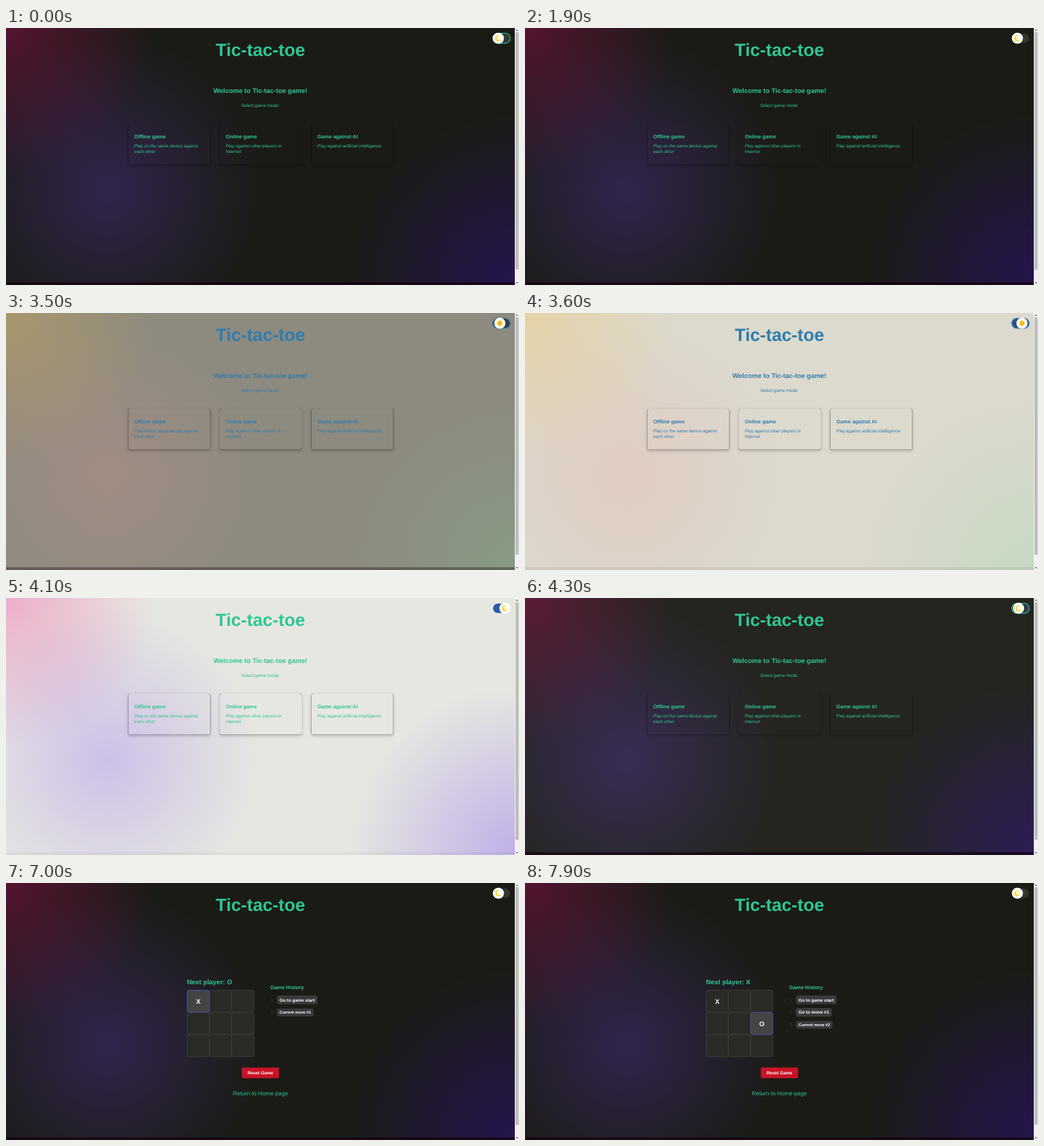
An HTML page with a canvas that plays this animation: 732 px wide and 368 px high, repeating every 8 s.

```html
<!DOCTYPE html>
<html lang="en">
<head>
<meta charset="utf-8">
<title>Tic-tac-toe</title>
<style>
html, body { margin: 0; width: 100%; height: 100%; overflow: hidden; background: #1b1b16; }
canvas { display: block; width: 732px; height: 368px; }
</style>
</head>
<body>
<canvas id="stage" width="732" height="368"></canvas>
<script>
const ctx = document.getElementById('stage').getContext('2d');
const LOOP = 8000, STEP = 100;
const PAGE_W = 726, PAGE_H = 364, MID = 363;
const ZOOM = 0.3957; // page pixels to stage pixels
const SANS = '"Liberation Sans", Arial, sans-serif';
const TO_LIGHT = 3410, TO_DARK = 4080, FADE = 300;
const OPEN_GAME = 5600, MOVE_X = 7000, MOVE_O = 7800;

const THEMES = {
  dark: { text: '#2ec794', glows: ['255,0,128,.25', '120,69,252,.24', '68,0,255,.24'] },
  light: { text: '#2e7daf', glows: ['255,190,50,.25', '240,150,150,.2', '110,220,150,.2'] }
};
const GLOW_SPOTS = [[0, 0, 215], [145, 232, 220], [PAGE_W, PAGE_H, 240]];
const CARDS = [
  [174.3, 'Offline game', 'Play on the same device against', 'each other'],
  [305, 'Online game', 'Play against other players in', 'Internet'],
  [435.6, 'Game against AI', 'Play against artificial intelligence']
];

const clamp = v => Math.min(1, Math.max(0, v));
const smooth = p => p * p * (3 - 2 * p);
const mix = (a, b, k) => `rgb(${a.map((v, i) => Math.round(v + (b[i] - v) * k))})`;

// The CSS "ease" curve, solved by bisection.
function ease(p) {
  const bez = (u, a, b) => 3 * (1 - u) ** 2 * u * a + 3 * (1 - u) * u * u * b + u ** 3;
  let lo = 0, hi = 1;
  for (let i = 0; i < 20; i++) {
    const u = (lo + hi) / 2;
    if (bez(u, .25, .25) < p) lo = u; else hi = u;
  }
  return bez(lo, .1, 1);
}

function rounded(x, y, w, h, r, fill, stroke, line = 0.6) {
  ctx.beginPath();
  ctx.roundRect(x, y, w, h, r);
  if (fill) { ctx.fillStyle = fill; ctx.fill(); }
  if (stroke) { ctx.strokeStyle = stroke; ctx.lineWidth = line; ctx.stroke(); }
}

function disc(x, y, r, fill) {
  ctx.beginPath();
  ctx.arc(x, y, r, 0, 7);
  ctx.fillStyle = fill;
  ctx.fill();
}

function text(str, x, y, size, color, { bold = false, align = 'left', family = SANS } = {}) {
  ctx.font = `${bold ? 'bold ' : ''}${size}px ${family}`;
  ctx.textAlign = align;
  ctx.fillStyle = color;
  ctx.fillText(str, x, y);
  return ctx.measureText(str).width;
}

function background(theme, lightness) {
  ctx.fillStyle = mix([27, 27, 22], [242, 242, 236], lightness);
  ctx.fillRect(0, 0, 732, 368);
  if (theme === THEMES.light) {
    ctx.fillStyle = 'rgba(200,160,60,.07)';
    ctx.fillRect(0, 0, 732, 368);
  }
  GLOW_SPOTS.forEach(([x, y, r], i) => {
    const glow = ctx.createRadialGradient(x, y, 0, x, y, r);
    const color = theme.glows[i];
    glow.addColorStop(0, `rgba(${color})`);
    glow.addColorStop(1, `rgba(${color.replace(/[^,]+$/, '0')})`);
    ctx.fillStyle = glow;
    ctx.fillRect(0, 0, PAGE_W, 368);
  });
  ctx.fillStyle = `rgba(18,3,12,${0.7 * (1 - lightness)})`;
  ctx.fillRect(0, PAGE_H, PAGE_W, 4);
}

function scrollbar() {
  ctx.fillStyle = '#f1f1f1';
  ctx.fillRect(PAGE_W, 0, 6, 368);
  ctx.fillStyle = '#bdbdbd';
  ctx.fillRect(727, 6, 4.5, 340);
  ctx.fillStyle = '#555';
  for (const [y, d] of [[3, -1], [365, 1]]) {
    ctx.beginPath();
    ctx.moveTo(727.6, y - d);
    ctx.lineTo(730.8, y - d);
    ctx.lineTo(729.2, y + d);
    ctx.fill();
  }
}

function toggle(theme, slide, ring) {
  rounded(695, 8, 24, 13.4, 6.7, mix([52, 52, 49], [42, 88, 168], slide));
  if (ring) rounded(694.5, 7.5, 25, 14.4, 7.2, null, theme.text, 1.1);
  const x = 702.6 + 9.4 * slide, y = 14.7;
  disc(x, y, 7.9, '#fff');
  if (theme === THEMES.dark) {
    disc(x - 0.2, y, 4.6, '#f6dc50');
    disc(x + 1.4, y - 0.8, 3.1, '#fffbe4');
  } else {
    disc(x, y, 4.2, '#f8cf3c');
    disc(x, y, 2.2, '#f0b030');
  }
}

function card(x, hover) {
  const y = 137, w = 117, h = 58.8;
  ctx.save();
  ctx.beginPath();
  ctx.rect(0, 0, 732, 368);
  ctx.roundRect(x, y, w, h, 3);
  ctx.clip('evenodd');
  ctx.shadowColor = 'rgba(0,0,0,.25)';
  ctx.shadowBlur = 4;
  ctx.shadowOffsetY = 1.4;
  rounded(x, y, w, h, 3, '#000');
  ctx.restore();
  if (hover) rounded(x, y, w, h, 3, `rgba(255,255,255,${0.05 * hover})`);
}

function homePage(t, color) {
  const centered = { align: 'center' };
  text('Welcome to Tic-tac-toe game!', MID, 92.6, 24 * ZOOM, color, { bold: true, ...centered });
  text('Select game mode:', MID, 113.2, 16 * ZOOM, color, centered);
  CARDS.forEach(([x, title, ...lines], i) => {
    card(x, i ? 0 : clamp((t - 5250) / 250));
    text(title, x + 8.7, 157.6, 18.72 * ZOOM, color, { bold: true });
    lines.forEach((line, n) => text(line, x + 8.7, 171.4 + n * 7.2, 16 * ZOOM, color));
  });
}

function historyItem(n, label, y) {
  const current = label.startsWith('Current');
  const size = (current ? 14.4 : 16) * ZOOM, h = current ? 11 : 12.4;
  text(n + '.', 383, y + 2.2, 16 * ZOOM, '#3c3c3a', { align: 'right' });
  ctx.font = `bold ${size}px ${SANS}`;
  rounded(386.5, y - h / 2, ctx.measureText(label).width + 7.6, h, 3, '#3a3a3a');
  text(label, 390.3, y + size * 0.35, size, '#fff', { bold: true });
}

function gamePage(t, color) {
  const moves = (t >= MOVE_X) + (t >= MOVE_O);
  const marks = { 0: moves > 0 && 'X', 5: moves > 1 && 'O' };
  const hover = {
    0: clamp((t - 6200) / 250) * clamp((7400 - t) / 250),
    5: clamp((t - 7250) / 250)
  };
  text('Next player: ' + (moves === 1 ? 'O' : 'X'), 258.2, 144.9, 24 * ZOOM, color, { bold: true });

  const cell = 31.75;
  const order = [0, 1, 2, 3, 4, 5, 6, 7, 8].sort((a, b) => (hover[a] || 0) - (hover[b] || 0));
  for (const i of order) {
    const x = 258.5 + (i % 3) * cell, y = 153.5 + Math.floor(i / 3) * cell, k = hover[i] || 0;
    rounded(x, y, cell, cell, 3, mix([42, 42, 38], [68, 68, 66], k), mix([66, 66, 62], [82, 76, 200], k), 0.8);
    if (marks[i]) text(marks[i], x + cell / 2, y + 19.6, 24 * ZOOM, '#fff', { bold: true, align: 'center' });
  }

  text('Game History', 377, 152.1, 18.72 * ZOOM, color, { bold: true });
  for (let n = 0; n <= moves; n++) {
    const past = n ? 'Go to move #' + n : 'Go to game start';
    const now = 'Current move' + (n ? ' #' + n : '');
    historyItem(n + 1, n < moves ? past : now, (moves ? 167.3 : 166.7) + n * 17.9);
  }

  rounded(336.6, 264.2, 53, 15.2, 1.6, '#c81427');
  text('Reset Game', MID, 274, 16 * ZOOM, '#fff', { bold: true, align: 'center' });
  text('Return to Home page', MID, 304.3, 20.8 * ZOOM, color, { align: 'center' });
}

function statusBar() {
  rounded(-1, 360.4, 126.6, 9, 1, '#48699f', '#7f97c2');
  text('https://tic-tac-toe-tan-zeta.vercel.app/offline', 1.8, 366.6, 5.9, '#fff',
    { family: '"Open Sans", "Noto Sans", sans-serif' });
}

function draw(t) {
  const light = t >= TO_LIGHT && t < TO_DARK;
  const theme = light ? THEMES.light : THEMES.dark;
  const p = t < TO_DARK ? clamp((t - TO_LIGHT) / FADE) : clamp((t - TO_DARK) / FADE);
  const blend = curve => t < TO_DARK ? curve(p) : 1 - curve(p);
  const ring = t < 100 || (t >= 3500 && t < 3800) || (t >= 4200 && t < 4500);

  background(theme, blend(ease));
  text('Tic-tac-toe', MID, 40.2, 64 * ZOOM, theme.text, { bold: true, align: 'center' });
  toggle(theme, blend(smooth), ring);
  (t < OPEN_GAME ? homePage : gamePage)(t, theme.text);
  if (t >= 5300 && t < 6200) statusBar();
  scrollbar();
}

function tick() {
  const t = performance.now() % LOOP;
  draw(Math.floor(t / STEP) * STEP);
  requestAnimationFrame(tick);
}
ctx.textRendering = 'geometricPrecision';
tick();
</script>
</body>
</html>
```
